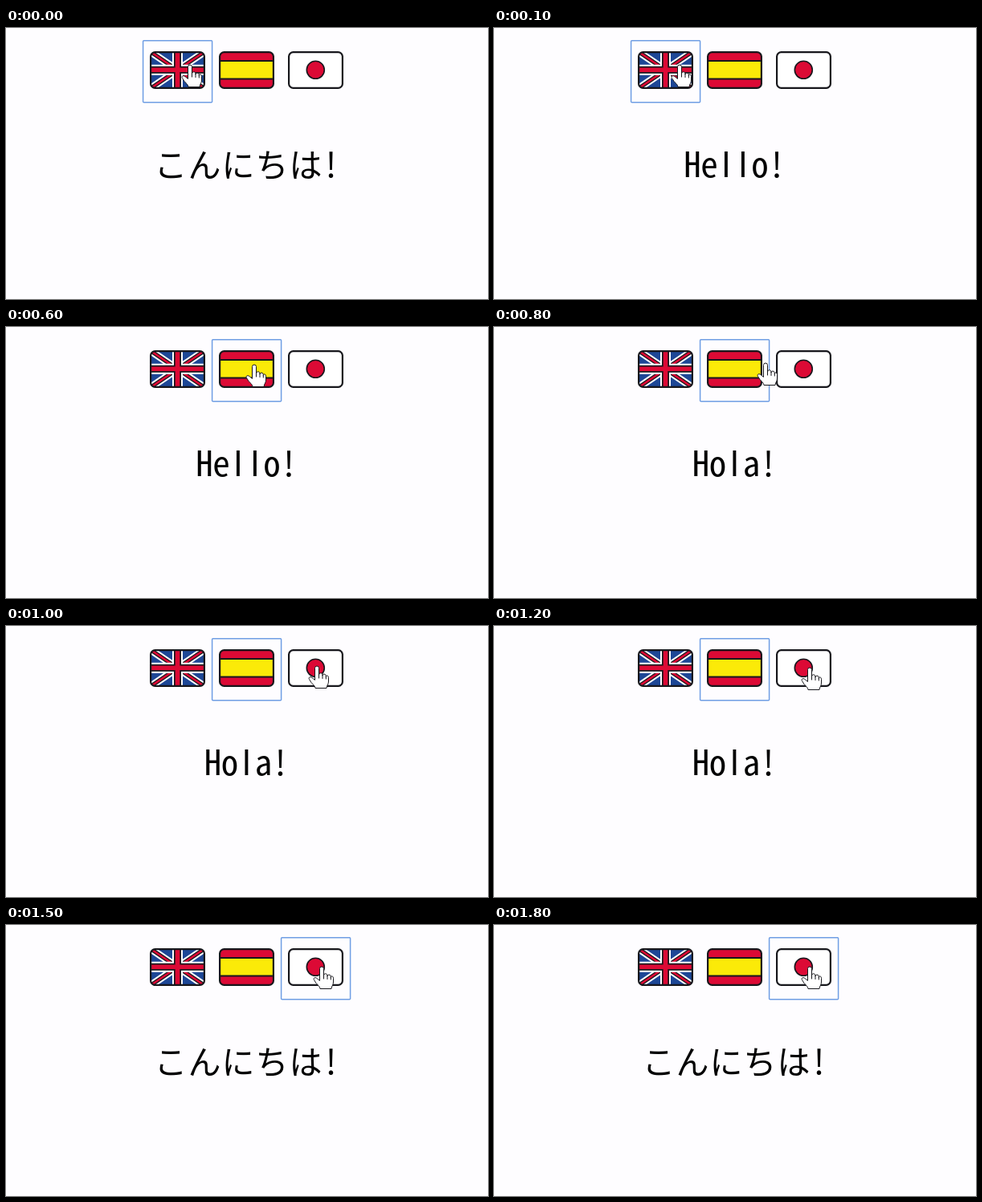
These frames come from a looping animation (600x338 px, 1.9 s). An HTML page:

```html
<!DOCTYPE html>
<html lang="ja">
<head>
<meta charset="utf-8">
<style>
  html, body { margin: 0; width: 100%; height: 100%; overflow: hidden; background: #fefdff; }
  svg { display: block; width: 100vw; height: 100vh; }
  text { text-anchor: middle; font: 41px "Noto Sans CJK JP", "Noto Sans CJK", sans-serif; }
  .latin { font: 43px "Noto Sans Mono CJK JP", "Noto Sans Mono", monospace; }
  .bar { font: 44px "Liberation Sans", sans-serif; }
  .edge { fill: none; stroke: #17171c; stroke-width: 2.2; }
</style>
</head>
<body>
<svg viewBox="0 0 600 338">
  <defs>
    <clipPath id="card"><rect x="1" y="1" width="67" height="45" rx="5"/></clipPath>
    <rect id="frame" class="edge" x="1.1" y="1.1" width="66.8" height="44.8" rx="5.5"/>
  </defs>

  <g transform="translate(179 29)">
    <g clip-path="url(#card)" fill="none">
      <path fill="#1d4796" d="M0 0h69v47H0z"/>
      <path stroke="#fff" stroke-width="9" d="M0 0 69 47M69 0 0 47"/>
      <path stroke="#17171c" stroke-width="5" d="M0 0 69 47M69 0 0 47"/>
      <path stroke="#dc0a35" stroke-width="2.6" d="M0 0 69 47M69 0 0 47"/>
      <path stroke="#fff" stroke-width="13" d="M34.5 0v47M0 23.3h69"/>
      <path stroke="#17171c" stroke-width="9" d="M34.5 0v47M0 23.3h69"/>
      <path stroke="#dc0a35" stroke-width="5.6" d="M34.5 0v47M0 23.3h69"/>
    </g>
    <use href="#frame"/>
  </g>

  <g transform="translate(265 29)">
    <g clip-path="url(#card)">
      <path fill="#dc0a35" d="M0 0h69v47H0z"/>
      <path fill="#fbea08" stroke="#17171c" stroke-width="2" d="M-2 12h73v22.5H-2z"/>
    </g>
    <use href="#frame"/>
  </g>

  <g transform="translate(351 29)">
    <path clip-path="url(#card)" fill="#fff" d="M0 0h69v47H0z"/>
    <circle cx="34.3" cy="23.3" r="11" fill="#dc0a35" stroke="#17171c" stroke-width="1.6"/>
    <use href="#frame"/>
  </g>

  <rect id="focus" y="15.8" width="86" height="77" rx="1" fill="none" stroke="#6f9ee4" stroke-width="1.5"/>
  <text id="greeting" y="185.5"></text>

  <g id="hand" stroke="#17171c" stroke-linejoin="round" stroke-linecap="round">
    <path fill="#fff" d="M-2.5 17V2.5a2.5 2.5 0 0 1 5 0V11c0-3 4.5-3 4.5 0v1c0-2.7 4.3-2.7 4.3.5v1c0-2.5 3.2-2 3.2.8V19c0 4-2 4.5-2.5 8.5H-2c0-3-3.5-5-5-7l-2.5-4c-1.5-2.5 1.5-4 3.5-2z"/>
    <path fill="none" d="M2.5 11v4M7 12v3.5M11.3 13.5v2.5"/>
  </g>
</svg>
<script>
  const LOOP = 1900, STEP = 100, HALF = 21, CENTER = 299.5;
  const byId = id => document.getElementById(id);

  // [time, x, y] of the fingertip
  const path = [
    [0, 229, 46], [100, 231, 46], [300, 294, 47], [400, 307, 47], [500, 309, 47], [600, 309, 47],
    [700, 315, 46], [800, 338, 45], [1000, 387, 50], [1100, 393, 52], [LOOP, 393, 52]
  ];

  function handAt(t) {
    const i = path.findIndex(key => key[0] > t);
    const [t0, x0, y0] = path[i - 1], [t1, x1, y1] = path[i];
    const u = (t - t0) / (t1 - t0);
    return [x0 + (x1 - x0) * u, y0 + (y1 - y0) * u];
  }

  // Latin characters take half a cell, kana a whole one
  function setGreeting(words) {
    const cell = c => c < '\u0100' ? HALF : 2 * HALF;
    const total = [...words].reduce((sum, c) => sum + cell(c), 0);
    let x = CENTER - total / 2;
    byId('greeting').replaceChildren(...[...words].map(c => {
      const span = document.createElementNS('http://www.w3.org/2000/svg', 'tspan');
      span.textContent = c;
      span.setAttribute('x', x + cell(c) / 2);
      span.setAttribute('class', c === 'l' ? 'bar' : c < '\u0100' ? 'latin' : '');
      x += cell(c);
      return span;
    }));
  }

  let shown = '';
  function draw() {
    const t = Math.floor(performance.now() % LOOP / STEP) * STEP;
    const words = t < 100 || t >= 1400 ? 'こんにちは!' : t < 700 ? 'Hello!' : 'Hola!';
    if (words !== shown) setGreeting(shown = words);
    const choice = t < 600 ? 0 : t < 1300 ? 1 : 2;
    byId('focus').setAttribute('x', 170.6 + 86 * choice);
    byId('hand').setAttribute('transform', `translate(${handAt(t)})`);
    requestAnimationFrame(draw);
  }
  draw();
</script>
</body>
</html>
```
